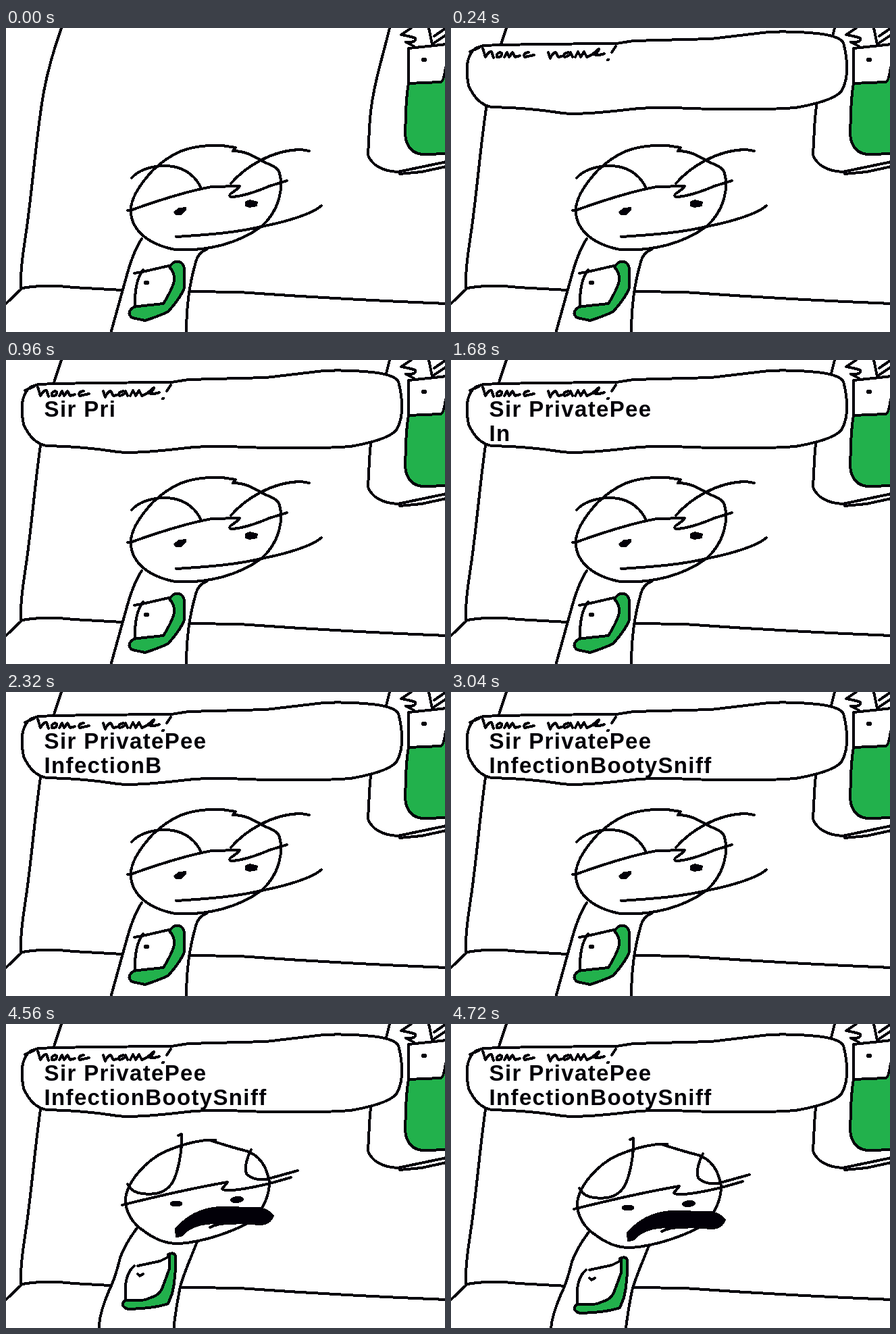
Recreate the animation shown at these times as an HTML page without scripts. Size 650 by 450 pixels, loop 7.04 s.

```html
<!DOCTYPE html>
<html lang="en">
<head>
<meta charset="utf-8">
<title>Name box</title>
<style>
  @property --n { syntax: "<number>"; inherits: true; initial-value: 0; }

  html, body { margin: 0; width: 100%; height: 100%; overflow: hidden; background: #fff; }
  svg { display: block; width: 650px; height: 450px; }

  path, ellipse { fill: none; stroke: #020008; stroke-width: 4; stroke-linecap: round; stroke-linejoin: round; shape-rendering: crispEdges; }
  .paper { fill: #fff; }
  .blank { fill: #fff; stroke: none; }
  .green { fill: #22b14c; }
  .ink { fill: #020008; stroke: none; }
  text { font: bold 33px "Liberation Sans", Arial, sans-serif; letter-spacing: 1.35px; fill: #020008; white-space: pre; }
  tspan { fill-opacity: clamp(0, var(--n) - var(--i), 1); }

  /* one step is 80 ms, 1/88 of the loop */
  .box, .eyes, .calm, .shock { animation: 7.04s step-end -2ms infinite; }
  .box { animation-name: drop; }
  .eyes { animation-name: look; }
  .calm { animation-name: leave; }
  .shock { animation-name: recoil; }
  .typed { animation: type 7.04s -2ms infinite; }

  @keyframes drop {
    0% { transform: translateY(-150px); }
    1.1364% { transform: translateY(-77px); }
    2.2727% { transform: translateY(-32px); }
    3.4091% { transform: translateY(-10px); }
    4.5455% { transform: translateY(-1px); }
    5.6818%, 100% { transform: none; }
  }
  @keyframes type {
    0% { --n: 0; }
    6.8182% { --n: 0; animation-timing-function: steps(32); }
    43.1818%, 100% { --n: 32; }
  }
  @keyframes look {
    0% { transform: none; }
    53.4091% { transform: translateY(-9px); }
    54.5455% { transform: translateY(-12px); }
    55.6818%, 100% { transform: translateY(-13px); }
  }
  @keyframes leave {
    0% { visibility: visible; }
    61.3636%, 100% { visibility: hidden; }
  }
  @keyframes recoil {
    0% { visibility: hidden; }
    61.3636% { visibility: visible; transform: translate(-64px, -38px); }
    62.5% { visibility: visible; transform: translate(-41px, -24px); }
    63.6364% { visibility: visible; transform: translate(-23px, -14px); }
    64.7727% { visibility: visible; transform: translate(-10px, -6px); }
    65.9091% { visibility: visible; transform: translate(-3px, -2px); }
    67.0455%, 100% { visibility: visible; transform: none; }
  }
</style>
</head>
<body>
<svg viewBox="0 0 650 450">
  <g class="room">
    <path d="M82 0C70 34 62 62 56 94C46 150 40 225 34 270C30 310 21 345 22 384"/>
    <path d="M0 408L24 385Q60 379 100 384L172 388L275 390L345 391Q500 402 652 408"/>
  </g>

  <g class="picture">
    <path d="M568 0C556 50 540 95 538 150L536 188Q545 211 580 213L652 198M583 216L615 213L652 205"/>
    <path d="M652 24L625 27L596 30V82"/>
    <path class="green" d="M596 82C591 110 592 140 591 158Q594 187 620 187L654 186V58H651Q648 80 643 80Z"/>
    <path d="M600 0L585 10Q598 12 606 15Q608 22 592 21L604 27M626 0L631 24L652 10M634 12L650 1"/>
    <ellipse class="ink" cx="619" cy="47" rx="4" ry="3.5"/>
  </g>

  <g class="calm">
    <path class="blank" d="M201 312Q190 328 180 362L155 452H267C267 420 270 385 280 350Q284 332 297 328Z"/>
    <path d="M201 312Q190 328 180 362L155 452M297 328Q284 332 280 350C270 385 267 420 267 452"/>
    <path class="green" d="M242 354Q248 344 256 346Q264 348 264 358V385Q258 400 240 420Q225 427 206 433L187 429Q180 424 184 418Q188 412 195 412L233 408Q247 385 249 374Q250 362 242 354Z"/>
    <path d="M190 363L202 361L241 352M203 358Q190 375 191 412"/>
    <ellipse class="ink" cx="208" cy="377" rx="4.5" ry="3"/>
    <path class="paper" d="M340 177L320 174C270 172 245 185 218 210C190 240 183 260 185 275C188 300 210 320 250 328C300 331 345 318 378 294C405 270 412 235 404 212C398 203 392 204 378 196C362 187 352 182 336 182Z"/>
    <path d="M186 222Q200 206 232 204Q272 203 289 237M333 230C355 205 395 180 437 180L449 182"/>
    <path d="M180 270L187 269C235 252 275 240 305 235L346 234Q344 238 333 245Q329 249 334 250Q355 249 390 234L416 226"/>
    <path d="M252 309C300 306 340 303 378 294C420 286 455 274 467 263"/>
    <g class="eyes">
      <path class="ink" d="M248 272L256 266L267 265V270L259 277H251Z"/>
      <path class="ink" d="M354 257L361 254L373 257L372 264L360 266L354 264Z"/>
    </g>
  </g>

  <g class="shock">
    <path class="blank" d="M204 308Q186 332 179 352Q172 382 162 402Q150 430 148 450V500H259V450Q262 425 268 395C274 372 285 350 293 328Z"/>
    <path d="M204 308Q186 332 179 352Q172 382 162 402Q150 430 148 450V500M293 328C285 350 274 372 268 395Q262 425 259 450V500"/>
    <path class="green" d="M250 347Q258 343 261 349Q262 380 256 405L250 420Q230 427 190 428Q180 424 184 417L187 415L250 355Z"/>
    <path class="paper" d="M200 364Q188 374 187 395V415Q215 417 224 411Q236 408 241 398L252 368V350L238 357L205 364"/>
    <path d="M205 376L208 379L213 376"/>
    <path class="paper" d="M320 178L305 178C280 181 262 188 245 195C218 208 190 238 187 264C186 285 198 302 215 313C232 326 248 332 268 331C305 328 342 314 366 302C392 285 400 258 400 240C396 216 384 200 366 194Q342 188 312 178"/>
    <path d="M265 171L270 169V185Q267 218 258 238Q249 254 232 257Q205 260 195 250L190 243M373 192C366 205 362 222 367 229Q378 238 395 236L442 223"/>
    <path d="M182 274C230 262 280 250 338 240Q334 245 330 250Q332 253 345 252Q380 249 432 233"/>
    <ellipse class="ink" cx="262" cy="272" rx="9.5" ry="4.5"/>
    <ellipse class="ink" cx="352" cy="266" rx="10" ry="5" transform="rotate(-6 352 266)"/>
    <path class="ink" d="M260 309Q285 279 325 276L385 277Q399 279 407 290Q402 304 385 304Q330 299 300 304Q280 309 270 321L261 322Z"/>
    <path d="M312 307Q325 300 350 301"/>
  </g>

  <g class="box">
    <path class="paper" d="M48 36Q90 34 245 33L270 29L385 26L470 16Q510 14 550 19Q576 23 581 32Q592 75 580 100Q573 117 510 128Q440 133 330 128Q290 127 260 131Q190 139 165 136Q115 128 60 127Q38 123 26 95Q18 55 36 40Z"/>
    <path d="M28 45L42 39"/>
    <path d="M47 40L51 53Q55 45 60 45L63 54M73 46Q66 48 68 53Q76 54 75 47M79 53L83 46L86 53L91 46L95 53L102 51M115 46Q106 47 109 53L123 50"/>
    <path d="M144 46L147 55Q151 46 155 46L159 53L164 52M174 46Q165 48 168 53Q176 52 177 46L180 53M184 53L188 45L192 53L197 45L201 53L208 50L219 41Q217 48 212 47Q212 53 227 48M244 37L238 46M232 57h1"/>
  </g>

  <g class="typed">
    <text x="56.5" y="84"><tspan style="--i:0">S</tspan><tspan style="--i:1">i</tspan><tspan style="--i:2">r </tspan><tspan style="--i:3">P</tspan><tspan style="--i:4">r</tspan><tspan style="--i:5">i</tspan><tspan style="--i:6">v</tspan><tspan style="--i:7">a</tspan><tspan style="--i:8">t</tspan><tspan style="--i:9">e</tspan><tspan style="--i:10">P</tspan><tspan style="--i:11">e</tspan><tspan style="--i:12">e</tspan></text>
    <text x="56.5" y="120"><tspan style="--i:13">I</tspan><tspan style="--i:14">n</tspan><tspan style="--i:15">f</tspan><tspan style="--i:16">e</tspan><tspan style="--i:17">c</tspan><tspan style="--i:18">t</tspan><tspan style="--i:19">i</tspan><tspan style="--i:20">o</tspan><tspan style="--i:21">n</tspan><tspan style="--i:22">B</tspan><tspan style="--i:23">o</tspan><tspan style="--i:24">o</tspan><tspan style="--i:25">t</tspan><tspan style="--i:26">y</tspan><tspan style="--i:27">S</tspan><tspan style="--i:28">n</tspan><tspan style="--i:29">i</tspan><tspan style="--i:30">f</tspan><tspan style="--i:31">f</tspan></text>
  </g>
</svg>
</body>
</html>
```
